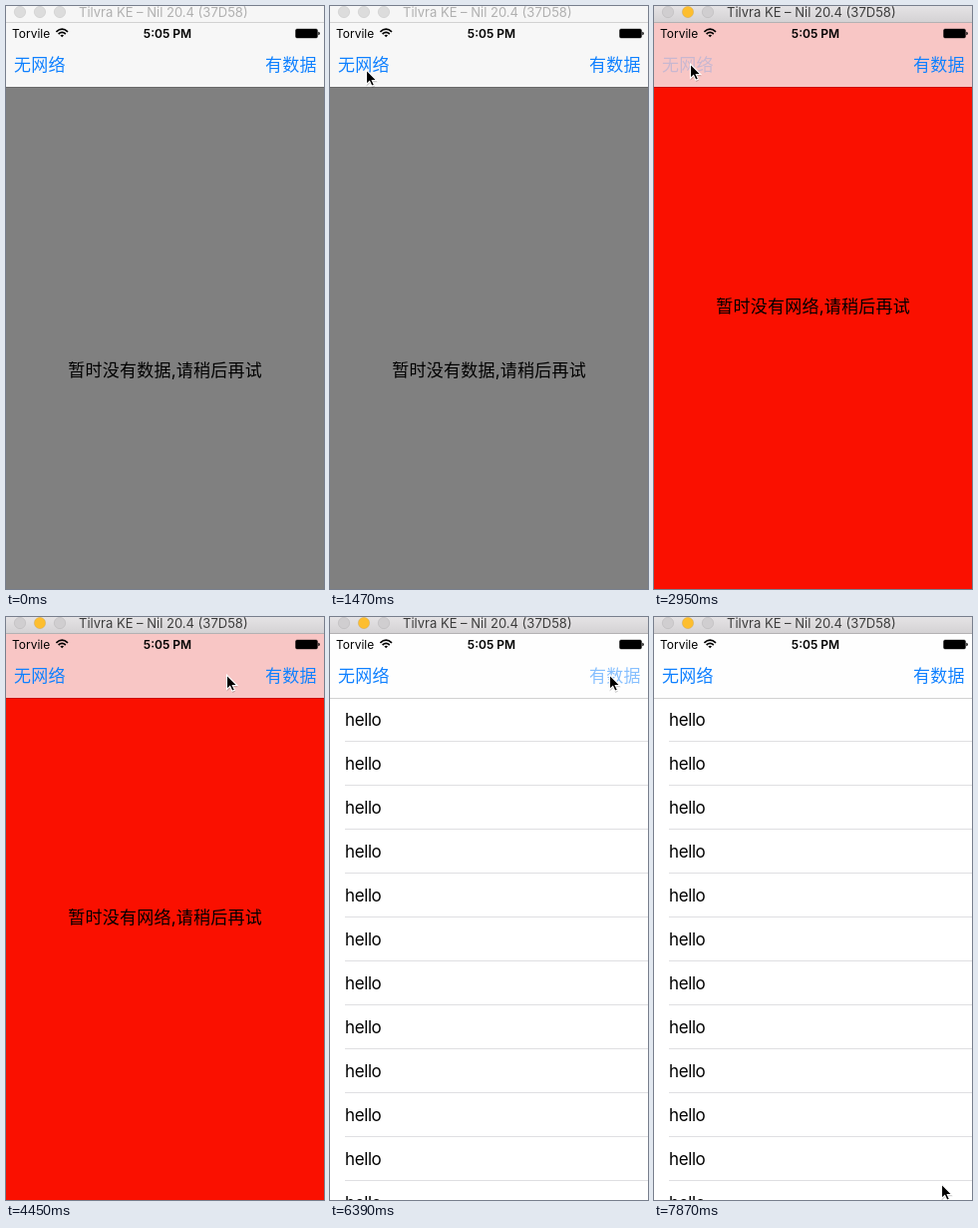
Animation, 319 px wide and 584 px high, one loop 8 s. Source, as an HTML page:

```html
<!DOCTYPE html>
<html lang="zh-CN">
<head>
<meta charset="utf-8">
<title>Empty states</title>
<style>
html, body { margin: 0; width: 100%; height: 100%; overflow: hidden; background: #fff; }
svg { display: block; width: 319px; height: 584px; font: 17px Inter, "Noto Sans CJK SC", "Noto Sans CJK", sans-serif; }
.button { fill: #0f80ff; letter-spacing: .2px; }
.message { letter-spacing: .23px; text-anchor: middle; }
.small { font-size: 12px; }
.title { font-size: 13px; }
.row { letter-spacing: -.4px; }
</style>
</head>
<body>
<svg viewBox="0 0 319 584">
  <defs>
    <linearGradient id="chrome" x2="0" y2="1">
      <stop stop-color="#e5e3e5"/><stop offset="1" stop-color="#d3d1d3"/>
    </linearGradient>
  </defs>

  <rect id="screen" y="81" width="319" height="503" fill="#808080"/>
  <text id="noData" class="message" x="159.7" y="371">暂时没有数据,请稍后再试</text>
  <text id="offline" class="message" x="159.7" y="307">暂时没有网络,请稍后再试</text>
  <g id="list"></g>

  <rect id="nav" y="17" width="319" height="64" fill="#f7f7f7"/>
  <rect y="81" width="319" height="1" opacity=".18"/>
  <text id="left" class="button" x="8" y="65">无网络</text>
  <text id="right" class="button" x="260" y="65">有数据</text>

  <text class="small" x="6" y="32">Torvile</text>
  <g fill="none" stroke="#000" stroke-width="1.7">
    <path d="M50.4 25.8Q56.2 20.6 62 25.8M52.6 28Q56.2 24.9 59.8 28"/>
    <path d="M54.4 29.5Q56.2 28 58 29.5L56.2 31.3Z" fill="#000" stroke="none"/>
  </g>
  <text class="small" x="162" y="32" text-anchor="middle" font-weight="600">5:05 PM</text>
  <rect x="290.5" y="23" width="22" height="9" rx="1.5" stroke="#000" stroke-opacity=".4"/>
  <path d="M313.3 25.8q1.5 0 1.5 1.7t-1.5 1.7z"/>

  <rect width="319" height="17" fill="#f6f6f6"/>
  <rect id="activeBar" width="319" height="17" fill="url(#chrome)"/>
  <rect id="barLine" y="16" width="319" height="1" fill="#d2d2d2"/>
  <g id="lights" fill="#dcdcdc" stroke="#000" stroke-opacity=".1" stroke-width=".8">
    <circle cx="14" cy="6" r="5.7"/>
    <circle id="minimize" cx="34" cy="6" r="5.7"/>
    <circle cx="54" cy="6" r="5.7"/>
  </g>
  <text id="caption" class="title" x="73" y="11" fill="#b0b0b0">Tilvra KE – Nil 20.4 (37D58)</text>

  <g id="pointer">
    <path d="M.5 2V17.5l3.6-3 2.2 4.4 2.7-1.2-2.1-4.4h4.9z" opacity=".18"/>
    <path d="M.5 1V15.4l3.2-3 2.2 4.8 2.5-1.1-2.1-4.6h4.6z" stroke="#fff" stroke-width="1.1"/>
  </g>
</svg>
<script>
const LOOP = 8000, TICK = 146.5;
const POINTER_IN = 440, OFFLINE = 2950, PRESS_RIGHT = 6090, LIST = 6390;
const $ = id => document.getElementById(id);
const range = n => [...Array(n).keys()];

$('list').innerHTML = '<rect y="81" width="319" height="503" fill="#fff"/>' +
  range(12).map(i => {
    const y = 81 + 44 * i;
    return `<text class="row" x="15" y="${y + 28}">hello</text>
      <rect x="15" y="${y + 43}" width="304" height="1" fill="#dfdfe2"/>`;
  }).join('');

// Each step is [time, value]; the value holds until the next step.
function play(id, prop, ...steps) {
  $(id).animate(
    steps.map(([t, value]) => ({ offset: t / LOOP, [prop]: value, easing: 'step-end' })),
    { duration: LOOP, iterations: Infinity });
}
const show = (id, from, to = LOOP) =>
  play(id, 'opacity', [0, from ? 0 : 1], [from, 1], [to, 0]);
const fill = (id, before, offline, list = offline) =>
  play(id, 'fill', [0, before], [OFFLINE, offline], [LIST, list]);

fill('screen', '#808080', '#fa1000', '#fff');
fill('nav', '#f7f7f7', '#f8c6c5', '#fefefe');
fill('barLine', '#d2d2d2', '#b3b1b3');
fill('caption', '#b0b0b0', '#3c3c3c');
fill('lights', '#dcdcdc', '#d0ced0');
fill('minimize', '#dcdcdc', '#fdbe2f');

show('noData', 0, OFFLINE);
show('offline', OFFLINE, LIST);
show('activeBar', OFFLINE);
show('list', LIST);
show('pointer', POINTER_IN);

// A pressed button dims at once and recovers tick by tick after release.
const press = (id, at, release) => play(id, 'opacity', [0, 1], [at, .2],
  ...range(3).map(i => [release + i * TICK, Math.min(1, .5 + .3 * i)]));
press('left', OFFLINE, OFFLINE + TICK);
press('right', PRESS_RIGHT, LIST);

// Pointer positions along a quadratic curve, one per tick.
const linear = u => u;
const easeOut = u => 1 - (1 - u) ** 2;
const smooth = u => u * u * (3 - 2 * u);
const sweep = (start, count, from, bend, to, ease) => range(count).map(i => {
  const u = ease(i / (count - 1)), v = 1 - u;
  const [x, y] = from.map((a, k) => Math.round(v * v * a + 2 * u * v * bend[k] + u * u * to[k]));
  return [start + i * TICK, `translate(${x}px, ${y}px)`];
});
play('pointer', 'transform',
  ...sweep(POINTER_IN, 8, [247, 294], [90, 80], [36, 63], easeOut),
  ...sweep(1760, 8, [40, 67], [82, 94], [36, 57], linear),
  ...sweep(4150, 4, [58, 58], [165, 58], [280, 57], smooth),
  ...sweep(7430, 4, [270, 90], [254, 300], [288, 567], linear));
</script>
</body>
</html>
```
